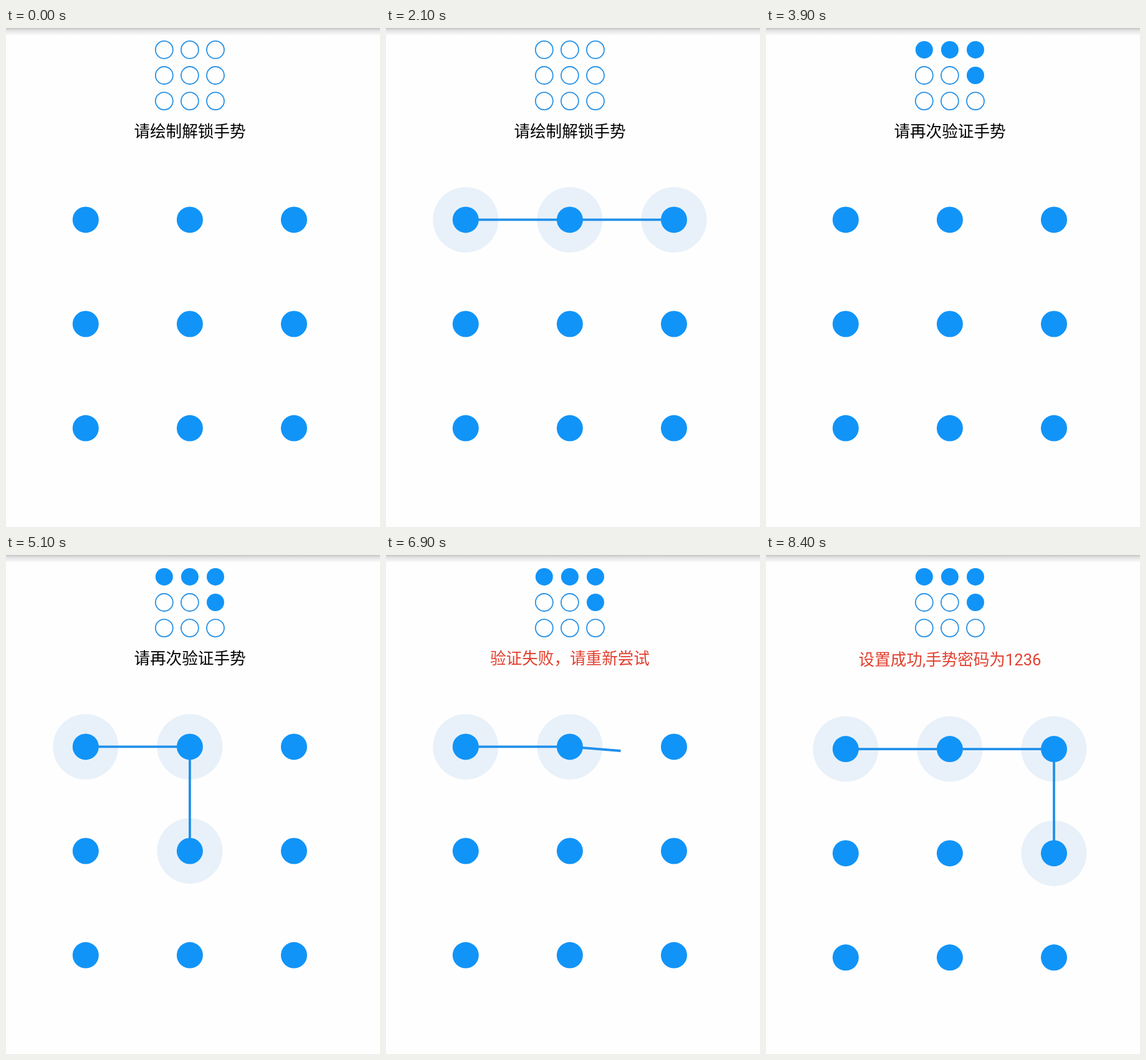
An HTML page for the animation above (8.7 s loop, 600 by 800 pixels).

```html
<!DOCTYPE html>
<html lang="zh-CN">
<head>
<meta charset="utf-8">
<style>
  html, body { margin: 0; width: 100%; height: 100%; overflow: hidden; background: #fefefe; }
  svg { display: block; width: 600px; height: 800px; }
  text { font: 25.6px Roboto, "Noto Sans CJK SC", "Noto Sans CJK", sans-serif; text-anchor: middle; }
  .dot, .on { fill: #1194f8; }
  .halo { fill: #e8f1f9; }
  .ring { fill: #fefefe; stroke: #2b93e5; stroke-width: 1.8; }
  #line { fill: none; stroke: #2190ea; stroke-width: 3.8; }
</style>
</head>
<body>
<svg viewBox="0 0 600 800">
  <defs>
    <linearGradient id="shade" x2="0" y2="1">
      <stop offset="0" stop-color="#c4c4c4"/>
      <stop offset=".35" stop-color="#e2e2e2"/>
      <stop offset=".8" stop-color="#f3f3f3"/>
      <stop offset="1" stop-color="#f7f7f7"/>
    </linearGradient>
  </defs>
  <rect width="600" height="800" fill="#fefefe"/>
  <rect width="600" height="11" fill="url(#shade)"/>
  <g id="mini"></g>
  <text id="label" x="295"></text>
  <g id="pad">
    <g id="halos"></g>
    <polyline id="line"/>
    <g id="dots"></g>
  </g>
</svg>
<script>
const STEP = 300, LOOP = 8700;
const $ = id => document.getElementById(id);

const MESSAGES = {
  draw: ['请绘制解锁手势', '#000'],
  again: ['请再次验证手势', '#000'],
  fail: ['验证失败，请重新尝试', '#e2402f'],
  done: ['设置成功,手势密码为1236', '#e2402f']
};

// [first step, message, joined dots, finger position]
const STATES = [
  [0, 'draw', ''],
  [3, 'draw', '1', [176, 308]],
  [4, 'draw', '1', [228, 309]],
  [5, 'draw', '12', [318, 309]],
  [6, 'draw', '12', [384, 309]],
  [7, 'draw', '123'],
  [8, 'draw', '123', [462, 385]],
  [9, 'draw', '1236'],
  [10, 'again', '1236'],
  [12, 'again', ''],
  [14, 'again', '1'],
  [15, 'again', '1', [212, 308]],
  [16, 'again', '12', [296, 352]],
  [17, 'again', '125'],
  [18, 'fail', '125'],
  [20, 'fail', ''],
  [22, 'fail', '1', [194, 310]],
  [23, 'fail', '12', [376.5, 314]],
  [24, 'fail', '123', [463, 345]],
  [25, 'fail', '1236'],
  [26, 'done', '1236']
];

const point = (n, x, y, gap) => [x + n % 3 * gap, y + Math.floor(n / 3) * gap];
const padPoint = n => point(n, 127.8, 307.4, 167.1);

function circle(parent, [cx, cy], r, cls) {
  const el = document.createElementNS('http://www.w3.org/2000/svg', 'circle');
  Object.entries({ cx, cy, r, class: cls }).forEach(([k, v]) => el.setAttribute(k, v));
  return $(parent).appendChild(el);
}

const minis = [], halos = [];
for (let n = 0; n < 9; n++) {
  minis.push(circle('mini', point(n, 253.8, 34.9, 41.1), 14, 'ring'));
  halos.push(circle('halos', padPoint(n), 52.5, 'halo'));
  circle('dots', padPoint(n), 21, 'dot');
}

function show([, key, path, finger]) {
  const [text, color] = MESSAGES[key];
  const done = key === 'done';
  $('label').textContent = text;
  $('label').setAttribute('fill', color);
  $('label').setAttribute('y', done ? 177 : 175);
  $('pad').setAttribute('transform', `translate(0 ${done ? 3.7 : 0})`);

  minis.forEach((el, n) => {
    const on = key !== 'draw' && '1236'.includes(n + 1);
    el.setAttribute('class', on ? 'on' : 'ring');
  });
  halos.forEach((el, n) => {
    el.style.display = path.includes(n + 1) ? '' : 'none';
  });
  const points = [...path].map(c => padPoint(c - 1));
  if (finger) points.push(finger);
  $('line').setAttribute('points', points.join(' '));
}

let current;
function tick() {
  const step = Math.floor(performance.now() % LOOP / STEP);
  const state = STATES.filter(s => s[0] <= step).pop();
  if (state !== current) show(current = state);
  requestAnimationFrame(tick);
}
tick();
</script>
</body>
</html>
```
